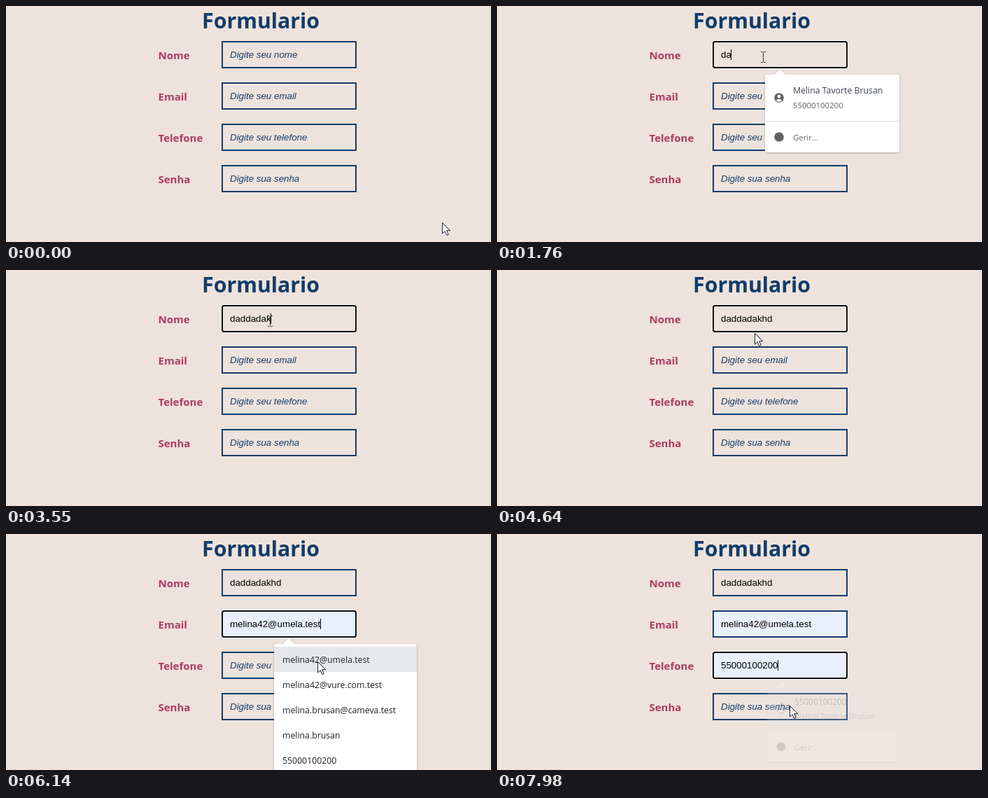
An HTML page for the animation above (8 s loop, 693 px wide and 337 px high).

```html
<!DOCTYPE html>
<html lang="pt">
<head>
<meta charset="utf-8">
<title>Formulario</title>
<style>
  html, body { margin: 0; width: 100%; height: 100%; overflow: hidden; background: #eee2dc; }
  svg { display: block; width: 693px; height: 337px; }
  text { white-space: pre; }
  .title, .label { font-family: "Open Sans", "Noto Sans", sans-serif; font-weight: 700; }
  .title { font-size: 30.3px; fill: #123c69; }
  .label { font-size: 15px; fill: #ac3b61; }
  .value { font: 13.333px "Liberation Sans", Arial, sans-serif; fill: #000; }
  .hint { font-style: italic; fill: #123c69; }
  .menu { font: 12.3px "Open Sans", "Noto Sans", sans-serif; fill: #202124; }
  .lead { fill: #3c4252; }
  .small { font-size: 11.4px; fill: #5f6368; }
  .halo { fill: #f4e64c; mix-blend-mode: multiply; }
</style>
</head>
<body>
<svg id="stage" viewBox="0 0 693 337"></svg>
<script>
const LOOP = 8000, STEP = 68;
const NAVY = '#123c69', GREY = '#5f6368';
const PERSON = 'Melina Tavorte Brusan';
const PHONE = '55000100200';
const EMAIL = 'melina42@umela.test';
const stage = document.getElementById('stage');

function add(parent, tag, attrs, text) {
  const el = document.createElementNS('http://www.w3.org/2000/svg', tag);
  set(el, attrs);
  if (text) el.textContent = text;
  parent.appendChild(el);
  return el;
}
function set(el, attrs) {
  for (const k in attrs) el.setAttribute(k, attrs[k]);
}
const show = (el, on) => el.style.display = on ? '' : 'none';
const within = (t, spans) => spans.some(([a, b]) => t >= a && t < b);
const clamp = v => Math.max(0, Math.min(1, v));

// Form
add(stage, 'text', { x: 280, y: 32, class: 'title' }, 'Formulario');

const fields = [
  ['Nome', 'Digite seu nome'],
  ['Email', 'Digite seu email'],
  ['Telefone', 'Digite seu telefone'],
  ['Senha', 'Digite sua senha']
].map(([label, hint], i) => {
  const y = 50 + 59 * i;
  add(stage, 'text', { x: 217.5, y: y + 26, class: 'label' }, label);
  const glow = add(stage, 'rect', { x: 307.5, y: y - .5, width: 194, height: 40, rx: 3.5,
    fill: 'none', stroke: '#fff', 'stroke-opacity': .6 });
  const box = add(stage, 'rect', { x: 309, y: y + 1, width: 191, height: 37, 'stroke-width': 2 });
  const text = add(stage, 'text', { x: 320, y: y + 24 });
  const caret = add(stage, 'rect', { y: y + 12, width: 1, height: 15, fill: '#000' });
  return { hint, glow, box, text, caret, y };
});

// Suggestion menus
function makeMenu(top, width, height, times) {
  const g = add(stage, 'g', {});
  const left = 383, right = left + width, bottom = top + height;
  const shape = `M${left + 3} ${top}H396l8 -8 8 8H${right - 3}q3 0 3 3V${bottom - 3}q0 3 -3 3`
    + `H${left + 3}q-3 0 -3 -3V${top + 3}q0 -3 3 -3z`;
  add(g, 'path', { d: shape, fill: '#fff',
    style: 'filter:drop-shadow(0 1px 1.5px rgba(60,50,50,.35))' });
  return { g, times, cx: left + width / 2, cy: top + height / 2 };
}
function contactMenu(top, first, second, leadClass, times) {
  const menu = makeMenu(top, 192, 111, times), g = menu.g;
  menu.row = add(g, 'path', { d: `M383 ${top + 66}V${top + 3}q0 -3 3 -3H572q3 0 3 3V${top + 66}z`,
    fill: '#e8eaed' });
  add(g, 'rect', { x: 383, y: top + 66, width: 192, height: 1, fill: '#dadce0' });
  add(g, 'circle', { cx: 403, cy: top + 33, r: 6.8, fill: GREY });
  add(g, 'circle', { cx: 403, cy: top + 31, r: 2.4, fill: '#fff' });
  add(g, 'path', { d: `M398.6 ${top + 36.8}q4.4 -4 8.8 0q-4.4 3.8 -8.8 0z`, fill: '#fff' });
  add(g, 'circle', { cx: 403, cy: top + 89, r: 6.8, fill: GREY });
  add(g, 'text', { x: 423, y: top + 27, class: 'menu ' + leadClass }, first);
  add(g, 'text', { x: 423, y: top + 48, class: 'menu small' }, second);
  add(g, 'text', { x: 423, y: top + 94, class: 'menu small' }, 'Gerir...');
  return menu;
}
function emailMenu(times) {
  const menu = makeMenu(157, 204, 220, times);
  menu.row = add(menu.g, 'rect', { x: 383, y: 161, width: 204, height: 36, fill: '#e6e8ea' });
  [EMAIL, 'melina42@vure.com.test', 'melina.brusan@cameva.test', 'melina.brusan', PHONE]
    .forEach((s, i) => add(menu.g, 'text', { x: 395, y: 184 + 36 * i, class: 'menu' }, s));
  return menu;
}
// times: opening, open, closing, closed, hover start
const menus = [
  contactMenu(98, PERSON, PHONE, 'lead', [555, 680, 1890, 2040, 9e3]),
  emailMenu([5060, 5200, 6210, 6350, 5760]),
  contactMenu(216, PHONE, PERSON, '', [6520, 6660, 7900, 8000, 7590])
];

// Pointer
const halo = add(stage, 'circle', { r: 11.5, class: 'halo' });
const arrow = add(stage, 'path', { d: 'M.5 .5V16l3.7 -3.4 2.5 5.9 2.5 -1.1 -2.5 -5.7h5z',
  fill: '#fff', stroke: '#1c1c30', 'stroke-width': 1, 'stroke-linejoin': 'round' });
const beam = add(stage, 'path', {
  d: 'M-3.5 -7.5h2.5l1 1 1 -1h2.5M-3.5 7.5h2.5l1 -1 1 1h2.5M0 -6.5V6.5',
  fill: 'none', stroke: '#333', 'stroke-width': 1 });

// start, end, x, y
const moves = [
  [70, 560, 380, 73],
  [2690, 2760, 377, 73],
  [4500, 4640, 368, 90],
  [4710, 4980, 402, 128],
  [5380, 6000, 445, 182],
  [6280, 6480, 400, 183],
  [6890, 7200, 403, 214],
  [7500, 7840, 418, 245]
];
const clicks = [[620, 740], [4990, 5110], [6190, 6300], [6480, 6600], [7770, 7890]];

function pointerAt(t) {
  let x = 623, y = 309;
  for (const [a, b, tx, ty] of moves) {
    if (t < a) break;
    const count = Math.max(1, Math.round((b - a) / STEP));
    const p = clamp((Math.floor((t - a) / STEP) + 1) / count);
    const e = p * p * (3 - 2 * p);
    x += (tx - x) * e;
    y += (ty - y) * e;
  }
  return [x, y];
}

// Field state
const focusTimes = [[620, 5000], [5000, 6490], [6490, LOOP], [9e3, 9e3]];
const caretTimes = [
  [[620, 1150], [1560, 2430], [2960, 4240], [4740, 5000]],
  [[5000, 5500], [6000, 6490]],
  [[6490, 7000], [7500, LOOP]],
  []
];
const TYPED = 'daddadakhd';
const keyTimes = [1560, 1760, 1930, 3000, 3115, 3230, 3345, 3460, 3575, 3690];

function valueAt(i, t) {
  if (i === 0) return TYPED.slice(0, keyTimes.filter(k => t >= k).length);
  if (i === 1) return t >= 5760 ? EMAIL : '';
  if (i === 2) return t >= 7590 ? PHONE : '';
  return '';
}

function drawField(f, i, t) {
  const value = valueAt(i, t), focused = within(t, [focusTimes[i]]);
  set(f.box, {
    stroke: focused ? '#101010' : NAVY,
    rx: focused ? 2.5 : 0,
    fill: value && i > 0 ? '#e8f0fe' : 'none'
  });
  show(f.glow, focused);
  const content = value || f.hint;
  if (f.text.textContent !== content) f.text.textContent = content;
  set(f.text, { class: value ? 'value' : 'value hint' });
  const caretOn = within(t, caretTimes[i]);
  show(f.caret, caretOn);
  if (caretOn) {
    const w = value ? f.text.getComputedTextLength() : 0;
    set(f.caret, { x: 320 + Math.floor(w) });
  }
}

function drawMenu(m, t) {
  const [a, b, c, d, hover] = m.times;
  const fade = clamp((t - c) / (d - c));
  const alpha = Math.min(clamp((t - a) / (b - a)), 1 - fade);
  const s = 1 - .045 * fade;
  show(m.g, alpha > 0);
  show(m.row, t >= hover);
  set(m.g, { opacity: alpha,
    transform: `translate(${m.cx} ${m.cy}) scale(${s}) translate(${-m.cx} ${-m.cy})` });
}

function drawPointer(t) {
  const [x, y] = pointerAt(t);
  const top = [98, 157, 216];
  const overMenu = menus.some((m, i) =>
    t >= m.times[0] && t < m.times[3] && x > 383 && y > top[i]);
  const overField = !overMenu && x > 308 && x < 501
    && fields.some(f => y >= f.y && y < f.y + 39);
  show(beam, overField);
  show(arrow, !overField);
  set(overField ? beam : arrow,
    { transform: `translate(${Math.round(x) + (overField ? .5 : 0)} ${Math.round(y)})` });
  show(halo, within(t, clicks));
  set(halo, { cx: x - 2, cy: y - 1 });
}

function draw(t) {
  fields.forEach((f, i) => drawField(f, i, t));
  menus.forEach(m => drawMenu(m, t));
  drawPointer(t);
}

const start = performance.now();
function tick() {
  draw((performance.now() - start) % LOOP);
  requestAnimationFrame(tick);
}
tick();
</script>
</body>
</html>
```
